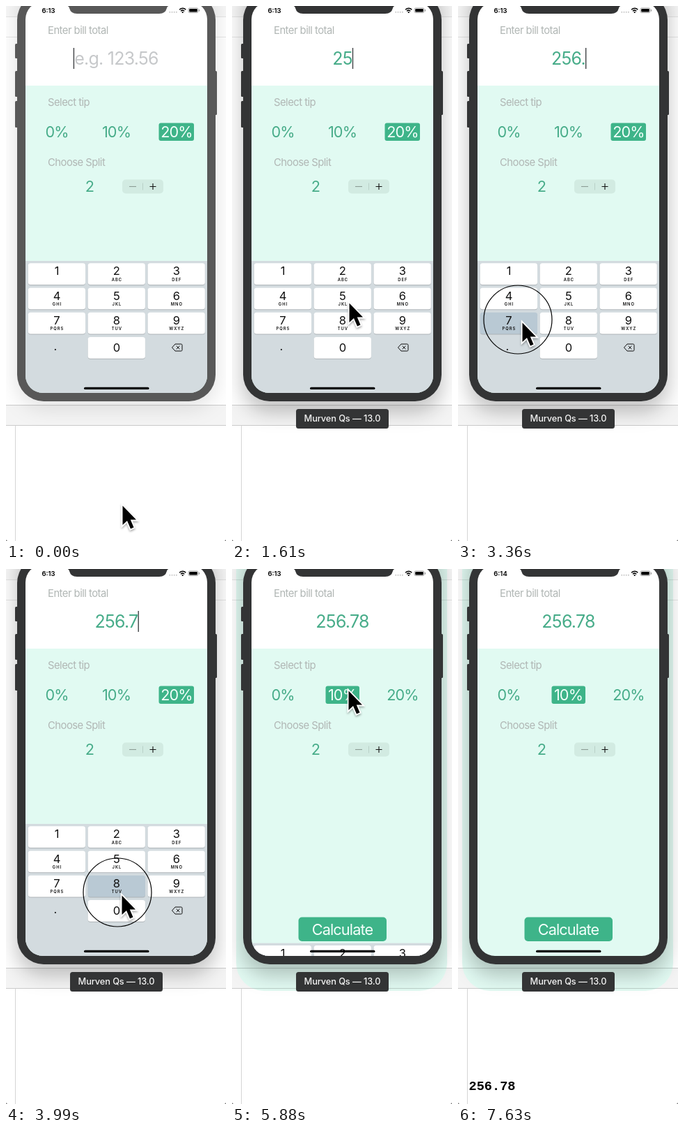
An HTML page that plays this animation: 316 px wide and 766 px high, repeating every 7910 ms.

```html
<!DOCTYPE html>
<html lang="en">
<head>
<meta charset="utf-8">
<title>Tip calculator</title>
<style>
  html, body { margin: 0; width: 100%; height: 100%; overflow: hidden; background: #fff; }
  svg { display: block; width: 100%; height: 100%; }
  text { font-family: Inter, Roboto, sans-serif; }
  .mid { text-anchor: middle; }
  .label { font-size: 14.8px; letter-spacing: -.035em; fill: #b0b6b4; }
  .big { font-size: 21.7px; letter-spacing: -.04em; fill: #47ac89; }
  .field { font-size: 25px; letter-spacing: -.03em; }
  .digit { font-size: 16.5px; fill: #111; }
  .abc { font-size: 5.8px; font-weight: 600; letter-spacing: 1px; fill: #111; }
  .output { font: bold 18.6px "Liberation Mono", "DejaVu Sans Mono", monospace; }
</style>
</head>
<body>
<svg viewBox="0 0 316 766" preserveAspectRatio="none">
  <defs>
    <clipPath id="screen"><rect x="28" y="-6" width="261" height="560" rx="25"/></clipPath>
    <filter id="blur" x="-30%" y="-20%" width="160%" height="140%"><feGaussianBlur stdDeviation="14"/></filter>
    <filter id="soft" x="-50%" y="-50%" width="220%" height="220%">
      <feDropShadow dx="0" dy="2" stdDeviation="1.5" flood-opacity=".35"/>
    </filter>
  </defs>

  <!-- desktop window -->
  <rect width="316" height="766" fill="#fff"/>
  <rect width="316" height="15" fill="#f8f8f8"/>
  <rect y="571" width="316" height="30" fill="#f4f4f4"/>
  <rect id="tint" x="6" y="-60" width="303" height="664" rx="40" fill="#e1faf2"/>
  <rect id="shade" x="14" y="-40" width="289" height="616" rx="40" filter="url(#blur)"/>
  <path d="M0 15.5H316M0 44.5H316" stroke="#000" stroke-opacity=".1"/>
  <path d="M0 571.5H316M0 600.5H316M13.5 601V766" stroke="#000" stroke-opacity=".17"/>
  <path d="M0 763V766H3Q0 766 0 763ZM316 763V766H313Q316 766 316 763Z" fill="#555"/>

  <!-- phone body -->
  <g id="body">
    <rect x="13" y="54" width="6" height="21" rx="1.5"/>
    <rect x="13" y="93" width="6" height="37" rx="1.5"/>
    <rect x="13" y="136" width="6" height="38" rx="1.5"/>
    <rect x="298" y="93" width="5" height="63" rx="1.5"/>
    <rect x="16" y="-18" width="285" height="584" rx="38"/>
  </g>

  <g clip-path="url(#screen)">
    <rect x="28" y="-6" width="261" height="121" fill="#fff"/>
    <rect x="28" y="114" width="261" height="440" fill="#e1faf2"/>

    <!-- status bar -->
    <text id="clock" class="mid" x="61" y="9.5" font-size="9.5" font-weight="600">6:13</text>
    <path d="M234.5 8.8H246" stroke="#bbb" stroke-width="1.6" stroke-dasharray="1.6 1.6"/>
    <g fill="none" stroke="#000" stroke-width="1.5">
      <path d="M249 5.2Q253.7 1.2 258.4 5.2M251 7.3Q253.7 5 256.4 7.3"/>
      <path d="M253.7 8.2V10" stroke-width="2"/>
    </g>
    <rect x="262" y="2.8" width="14" height="6.8" rx="2" fill="none" stroke="#888" stroke-width=".7"/>
    <rect x="263.2" y="4" width="11.6" height="4.4" rx="1"/>
    <path d="M277.4 5V7.6" stroke="#888"/>

    <!-- form -->
    <text class="label" x="60" y="40">Enter bill total</text>
    <text id="field" class="field mid" x="158.5" y="84"></text>
    <rect id="caret" y="60" width="1.4" height="30" fill="#3f4245"/>
    <text class="label" x="60" y="143">Select tip</text>
    <rect id="chip" y="167.5" height="25.5" rx="3" fill="#3eb489"/>
    <g id="tips"></g>
    <text class="label" x="60" y="228.5">Choose Split</text>
    <text class="big mid" x="120" y="266">2</text>
    <rect x="167" y="248.5" width="59" height="20" rx="5" fill="#d2ebe2"/>
    <path d="M177 258.5H187" stroke="#8b9c95" stroke-width="1.1"/>
    <path d="M196.5 253.5V263.5" stroke="#b9d0c7"/>
    <path d="M206.500 258.5H215.500M211 254V263" stroke="#111" stroke-width="1.1"/>
    <rect x="95.500" y="498.5" width="126.500" height="34.500" rx="5" fill="#3eb489"/>
    <text class="big mid" x="158.5" y="524" style="fill:#f4fffb">Calculate</text>

    <!-- keyboard -->
    <g id="board">
      <rect x="28" y="365" width="261" height="200" fill="#d3dbdf"/>
      <g id="keys"></g>
      <path d="M238.5 489L243 484H251.5Q253 484 253 485.5V492.5Q253 494 251.5 494H243ZM244.8 486.7L249.4 491.3M249.4 486.7L244.8 491.3"
        fill="none" stroke="#111"/>
    </g>
    <rect x="112" y="545.7" width="93.500" height="3.4" rx="1.7"/>
  </g>
  <path id="notch" d="M86-1Q90.500 0 91 3Q93 11 102 11H220Q229 11 231 3Q231.500 0 236-1Z"/>

  <g id="tag">
    <rect x="92" y="577" width="133" height="28" rx="3.5" fill="#333435"/>
    <text class="mid" x="158.5" y="595.4" font-size="12.8" font-weight="500" letter-spacing="-.1" fill="#f4f4f4">Murven Qs — 13.0</text>
  </g>
  <text id="output" class="output" x="15.500" y="746">256.78</text>

  <circle id="ring" r="49" fill="none" stroke="#000" stroke-width="1.2"/>
  <path id="arrow" d="M.5 1.5V29L7 23L12 34.500L16.500 32.500L11.800 21.500H20Z" stroke="#fff" stroke-width="3.4"
    paint-order="stroke" filter="url(#soft)"/>
</svg>

<script>
const LOOP = 7910, STEP = 70;
const $ = id => document.getElementById(id);
const NS = "http://www.w3.org/2000/svg";

function add(parent, tag, attrs, text = "") {
  const el = document.createElementNS(NS, tag);
  for (const k in attrs) el.setAttribute(k, attrs[k]);
  el.textContent = text;
  return parent.appendChild(el);
}
const show = (id, on) => $(id).setAttribute("visibility", on ? "visible" : "hidden");
const set = (id, attrs) => { for (const k in attrs) $(id).setAttribute(k, attrs[k]); };

// press, release, key
const clicks = [
  [1120, 1260, "2"], [1470, 1610, "5"], [1820, 1960, "6"], [2450, 2590, "."],
  [3290, 3430, "7"], [3920, 4060, "8"], [5390, 5530, ""], [6720, 6860, ""]
];
// time, x, y of the pointer tip
const path = [
  [210, 167, 714], [1050, 181, 387], [1190, 181, 387], [1470, 168, 424], [1610, 168, 424],
  [1820, 245, 424], [1960, 245, 424], [2310, 75, 492], [2800, 75, 492], [3220, 92, 452],
  [3430, 92, 452], [3850, 166, 466], [4480, 166, 466], [4900, 170, 270], [5320, 167, 173],
  [6160, 167, 173], [6650, 166, 514]
];
const TIP_AT = 5600, DROP_AT = 5670, DROP_TIME = 420, HIDE_AT = 7350;

const tips = [["0%", 73], ["10%", 158.5], ["20%", 245]].map(([s, x]) =>
  add($("tips"), "text", { class: "big mid", x, y: 188 }, s));

const letters = ["", "ABC", "DEF", "GHI", "JKL", "MNO", "PQRS", "TUV", "WXYZ"];
const keys = {};
function addKey(name, col, row, sub) {
  const x = 31.8 + col * 85.9, y = 368.3 + row * 35.2, mid = x + 41.2;
  add($("keys"), "rect", { x, y: y + 1, width: 82.2, height: 30.8, rx: 3.5, fill: "#aeb4b8" });
  keys[name] = add($("keys"), "rect", { x, y, width: 82.2, height: 30.8, rx: 3.5 });
  add($("keys"), "text", { class: "digit mid", x: mid, y: y + (row < 3 ? 17 : 21) }, name);
  if (sub) add($("keys"), "text", { class: "abc mid", x: mid + .5, y: y + 25.6 }, sub);
}
letters.forEach((sub, i) => addKey(String(i + 1), i % 3, Math.floor(i / 3), sub));
addKey("0", 1, 3, "");
add($("keys"), "text", { class: "digit mid", x: 71, y: 493 }, ".");

function pointer(t) {
  const i = path.findIndex(p => p[0] > t);
  if (i < 0) return path[path.length - 1].slice(1);
  if (i === 0) return path[0].slice(1);
  const [a, b] = [path[i - 1], path[i]];
  const u = (t - a[0]) / (b[0] - a[0]), e = u * u * (3 - 2 * u);
  return [a[1] + (b[1] - a[1]) * e, a[2] + (b[2] - a[2]) * e];
}

function drawField(t) {
  const done = clicks.filter(c => c[2] && t >= c[1]);
  const typed = done.map(c => c[2]).join("");
  const field = $("field");
  field.textContent = typed || "e.g. 123.56";
  field.setAttribute("fill", typed ? "#47ac89" : "#c6c8ca");
  const half = field.getComputedTextLength() / 2;
  const since = done.length ? t - done[done.length - 1][1] : t;
  set("caret", { x: typed ? 158.5 + half : 158.5 - half - 1.5 });
  show("caret", t < TIP_AT && since % 1050 < 790);
}

function draw(t) {
  const active = t >= clicks[0][0];
  set("body", { fill: active ? "#333435" : "#585858" });
  set("notch", { fill: active ? "#333435" : "#585858" });
  set("shade", { "fill-opacity": active ? .23 : .11, y: active ? -34 : -40 });
  show("tint", t >= TIP_AT);
  show("tag", t >= 980);
  show("output", t >= 6860);
  $("clock").textContent = t < 6580 ? "6:13" : "6:14";

  drawField(t);
  const pick = t < TIP_AT ? 2 : 1;
  tips.forEach((el, i) => el.style.fill = i === pick ? "#f1fffa" : "");
  set("chip", pick === 2 ? { x: 219.5, width: 50.5 } : { x: 134.5, width: 48.5 });

  const u = Math.min(1, Math.max(0, (t - DROP_AT) / DROP_TIME));
  set("board", { transform: `translate(0 ${195 * (1 - (1 - u) ** 3)})` });

  const press = clicks.find(c => t >= c[0] && t < c[1]);
  for (const k in keys) keys[k].setAttribute("fill", press && press[2] === k ? "#b9c9d4" : "#fff");
  const [x, y] = pointer(t);
  set("ring", { cx: x - 6, cy: y - 3 });
  show("ring", press);
  set("arrow", { transform: `translate(${x} ${y})` });
  show("arrow", t < HIDE_AT);
}

const start = performance.now();
function tick() {
  const t = (performance.now() - start) % LOOP;
  draw(Math.floor(t / STEP) * STEP);
  requestAnimationFrame(tick);
}
tick();
</script>
</body>
</html>
```
